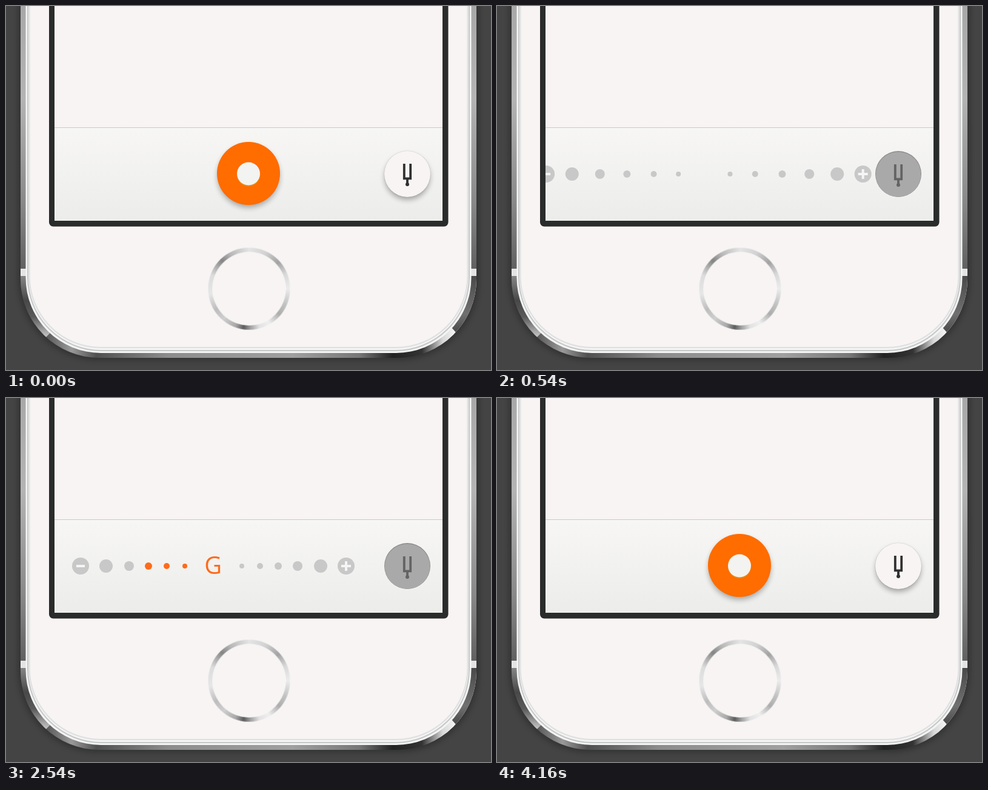
Animation of 800x600 px, one loop 4.18 s. Source, as an HTML page:

```html
<!DOCTYPE html>
<html lang="en">
<head>
<meta charset="utf-8">
<title>Tuner toggle</title>
<style>
html, body { margin: 0; width: 100%; height: 100%; overflow: hidden; background: #444; }
#stage { position: absolute; left: 0; top: 0; width: 800px; height: 600px; overflow: hidden; }
svg { position: absolute; left: 0; top: 0; display: block; }
.ring {
  position: absolute; left: 332.5px; top: 397.5px; width: 136px; height: 136px; border-radius: 50%;
  background: conic-gradient(#e4e4e4, #d2d2d2 25deg, #a2a2a2 48deg, #d8d8d8 68deg, #ececec 90deg,
    #c4c4c4 112deg, #adadad 130deg, #efefef 150deg, #e2e2e2 165deg, #a0a0a0 178deg, #5c5c5c 188deg,
    #a8a8a8 200deg, #cfcfcf 220deg, #bdbdbd 238deg, #e6e6e6 262deg, #dcdcdc 290deg, #858585 316deg,
    #b8b8b8 332deg, #e4e4e4 360deg);
  box-shadow: inset 0 0 0 1px rgba(255, 255, 255, .35);
}
.ring::after {
  content: ""; position: absolute; inset: 8px; border-radius: 50%;
  background: #f7f4f3; box-shadow: 0 0 0 1px rgba(255, 255, 255, .55);
}
</style>
</head>
<body>
<div id="stage">
<svg width="800" height="600" viewBox="0 0 800 600">
  <defs>
    <clipPath id="body"><rect x="24" y="-300" width="752" height="880" rx="130"/></clipPath>
    <clipPath id="screen"><rect x="80" y="0" width="640" height="354"/></clipPath>
    <linearGradient id="side" x2="0" y2="1">
      <stop stop-color="#a8a8a8"/><stop offset=".35" stop-color="#b4b4b4"/>
      <stop offset=".75" stop-color="#888"/><stop offset="1" stop-color="#606060"/>
    </linearGradient>
    <linearGradient id="cornerL" x2="0" y2="1">
      <stop stop-color="#858585"/><stop offset=".3" stop-color="#484848"/>
      <stop offset=".5" stop-color="#5a5a5a"/><stop offset=".75" stop-color="#c8c8c8"/>
      <stop offset="1" stop-color="#f2f2f2"/>
    </linearGradient>
    <linearGradient id="cornerR" x2="0" y2="1">
      <stop stop-color="#4a4a4a"/><stop offset=".5" stop-color="#707070"/>
      <stop offset="1" stop-color="#222"/>
    </linearGradient>
    <linearGradient id="base" gradientUnits="userSpaceOnUse" x1="60" x2="748" y1="0" y2="0">
      <stop stop-color="#505050"/><stop offset=".07" stop-color="#999"/>
      <stop offset=".13" stop-color="#505050"/><stop offset=".3" stop-color="#8c8c8c"/>
      <stop offset=".6" stop-color="#a0a0a0"/><stop offset=".76" stop-color="#777"/>
      <stop offset=".84" stop-color="#222"/><stop offset=".91" stop-color="#333"/>
      <stop offset=".96" stop-color="#d8d8d8"/><stop offset="1" stop-color="#fff"/>
    </linearGradient>
    <linearGradient id="bar" x2="0" y2="1">
      <stop stop-color="#f7f6f4"/><stop offset="1" stop-color="#ecedeb"/>
    </linearGradient>
    <filter id="soft" x="-30%" y="-30%" width="160%" height="160%"><feGaussianBlur stdDeviation="5"/></filter>
  </defs>

  <rect x="20" y="-300" width="760" height="884" rx="132" fill="#000" opacity=".25" filter="url(#soft)"/>
  <g clip-path="url(#body)">
    <rect x="24" width="752" height="434" fill="url(#side)"/>
    <rect x="24" y="445" width="752" height="135" fill="url(#base)"/>
    <path d="M24 445H140V470L62 550L24 580Z" fill="url(#cornerL)"/>
    <path d="M776 445H660L742 538L776 570Z" fill="url(#cornerR)"/>
    <rect x="24" y="433" width="752" height="12" fill="#e5e4e4"/>
  </g>
  <g fill="none">
    <rect x="32.5" y="-300" width="735" height="872" rx="124" fill="#f4f4f4"/>
    <rect x="36" y="-300" width="728" height="868" rx="121" stroke="#c6c8c8" stroke-width="2"/>
    <rect x="38.5" y="-300" width="723" height="863" rx="118" fill="#f7f4f3" stroke="#dedfdf" stroke-width="2"/>
  </g>

  <rect x="71" y="-20" width="658.5" height="383.5" rx="7" fill="#2a2c2b"/>
  <g clip-path="url(#screen)">
    <rect x="80" width="640" height="354" fill="#f7f4f3"/>
    <rect x="80" y="201" width="640" height="153" fill="url(#bar)"/>
    <rect x="80" y="200" width="640" height="1" fill="#cbcac9"/>

    <g id="record">
      <circle cy="281" r="51" opacity=".32" filter="url(#soft)"/>
      <circle cy="276" r="52" fill="#ff6c00"/>
      <circle cy="278.5" r="19" fill="#e68a0c"/>
      <circle cy="276.5" r="19" fill="#f3f3f1"/>
    </g>
    <g id="dots"></g>
    <text id="note" x="341.7" y="290" text-anchor="middle" fill="#ff6b1a" font-size="39.5"
      font-family="'Open Sans', 'Noto Sans', sans-serif">G</text>

    <g id="raised">
      <circle cx="662" cy="282" r="37" opacity=".34" filter="url(#soft)"/>
      <circle cx="662" cy="277" r="38.5" fill="#000" opacity=".12"/>
      <circle cx="662" cy="277" r="38" fill="#f7f4f3"/>
    </g>
    <g id="pressed">
      <circle cx="662" cy="278" r="38" fill="#fff" opacity=".7"/>
      <circle cx="662" cy="277" r="38" fill="#8c8c8c"/>
      <circle cx="662" cy="277.6" r="37.2" fill="#aaa9a9"/>
    </g>
    <g id="fork">
      <path d="M656.8 260V284.3H667.2V260M662 284V293" fill="none" stroke="currentColor" stroke-width="3.8"/>
      <circle cx="662" cy="294" r="3" fill="currentColor"/>
    </g>
  </g>
</svg>
<div class="ring"></div>
</div>

<script>
const LOOP = 4180;
const GRAY = [200, 200, 200], ORANGE = [255, 107, 26];
const ORIGIN = 340, CENTER = 342, DOT_Y = 277;
const PRESS = 40, RELEASE = 3370;
const $ = id => document.getElementById(id);

// Outermost first; `off` is when the left dot stops glowing.
const pairs = [
  { gap: 219, r: 14, off: 1760 },
  { gap: 177, r: 11, off: 1830 },
  { gap: 139, r: 8, off: 2300 },
  { gap: 107, r: 6, off: 2700 },
  { gap: 77, r: 5, off: 2850 },
  { gap: 47, r: 4, off: 3000 }
];

const ramp = (t, start, length) => Math.min(1, Math.max(0, (t - start) / length));
const mix = (a, b, k) => `rgb(${a.map((v, i) => Math.round(v + (b[i] - v) * k))})`;

// Underdamped spring: tension 150, friction 10.
function spring(ms) {
  if (ms <= 0) return 0;
  const s = ms / 1000, decay = 5, freq = Math.sqrt(125);
  return 1 - Math.exp(-decay * s) * (Math.cos(freq * s) + decay / freq * Math.sin(freq * s));
}

// Critically damped approach without overshoot.
function glide(ms) {
  const k = Math.max(0, ms) * 0.0158;
  return 1 - Math.exp(-k) * (1 + k);
}

function add(parent, tag, attrs) {
  const el = document.createElementNS("http://www.w3.org/2000/svg", tag);
  for (const key in attrs) el.setAttribute(key, attrs[key]);
  return parent.appendChild(el);
}

function makeDot(r, sign) {
  const g = add($("dots"), "g", {});
  add(g, "circle", { r });
  if (r === 14) {
    const d = sign < 0 ? "M-7 0H7" : "M-8 0H8M0 -8V8";
    add(g, "path", { d, stroke: "#f5f5f3", "stroke-width": 4 });
  }
  return g;
}

for (const p of pairs) {
  p.left = makeDot(p.r, -1);
  p.right = makeDot(p.r, 1);
}

function place(dot, target, k, color) {
  const x = ORIGIN + (target - ORIGIN) * k;
  dot.setAttribute("transform", `translate(${x.toFixed(2)} ${DOT_Y})`);
  dot.setAttribute("fill", color);
}

function draw(t) {
  const away = t < RELEASE ? glide(t - PRESS) : 1 - glide(t - RELEASE);
  $("record").setAttribute("transform", `translate(${(400 - 500 * away).toFixed(2)} 0)`);

  const down = ramp(t, PRESS, 140) - ramp(t, RELEASE, 140);
  $("raised").setAttribute("opacity", 1 - down);
  $("pressed").setAttribute("opacity", down);
  $("fork").setAttribute("transform", `translate(0 ${down})`);
  $("fork").setAttribute("color", mix([48, 48, 48], [99, 99, 99], down));

  $("dots").setAttribute("opacity", ramp(t, 100, 120) - ramp(t, 3380, 240));
  pairs.forEach((p, i) => {
    const k = spring(t - 200 - 36 * i);
    const glow = ramp(t, 1480, 160) - ramp(t, p.off, 190);
    place(p.left, CENTER - p.gap, k, mix(GRAY, ORANGE, glow));
    place(p.right, CENTER + p.gap, k, mix(GRAY, GRAY, 0));
  });

  $("note").setAttribute("opacity", ramp(t, 1480, 160) - ramp(t, 3180, 180));
}

const begin = performance.now();
function tick() {
  draw((performance.now() - begin) % LOOP);
  requestAnimationFrame(tick);
}
tick();
</script>
</body>
</html>
```
